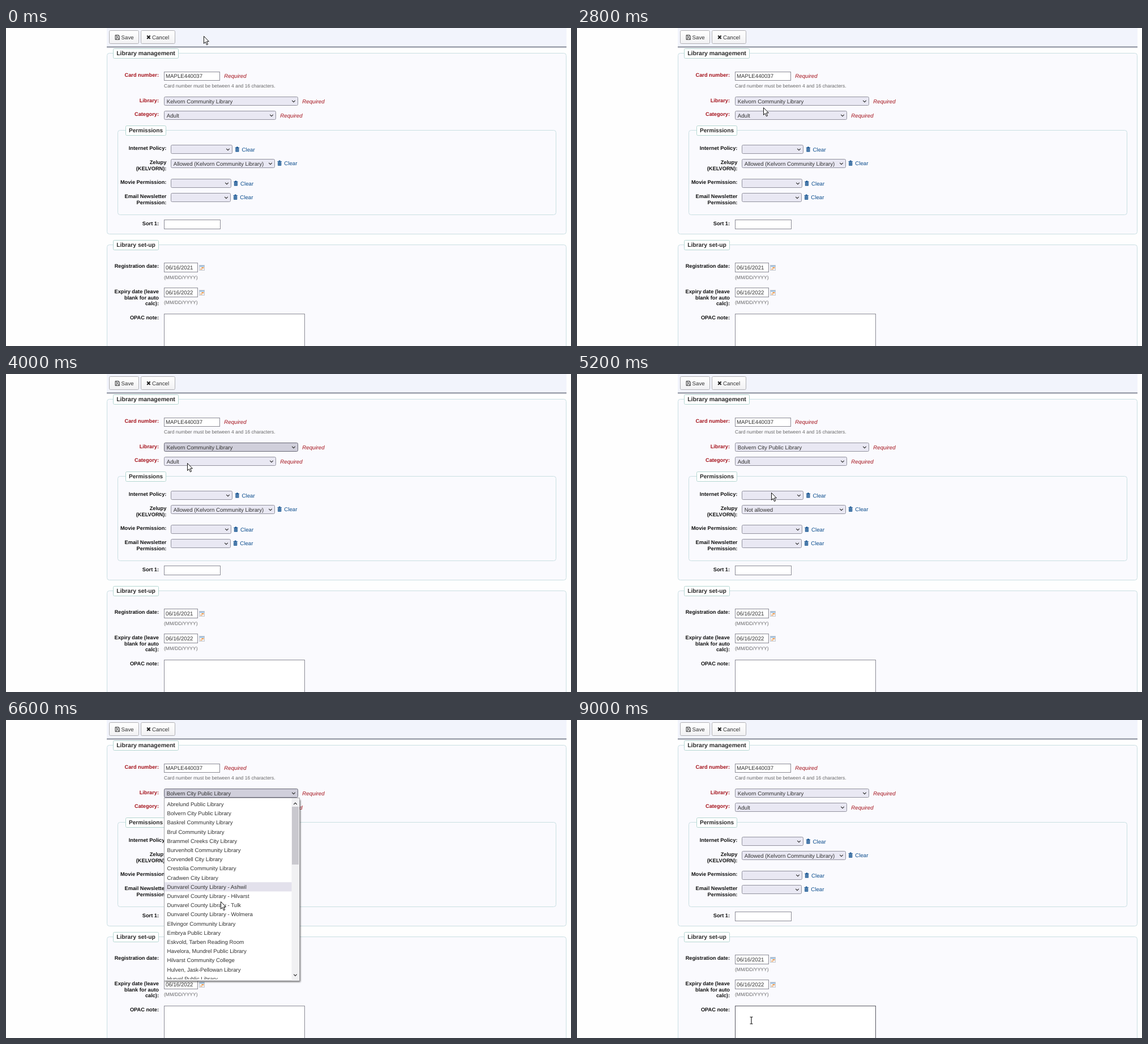
Recreate the animation shown at these times as an HTML page. Size 998 px wide and 561 px high, loop 9.2 s.

```html
<!DOCTYPE html>
<html lang="en">
<head>
<meta charset="utf-8">
<title>Patron form</title>
<style>
html, body { margin: 0; width: 100%; height: 100%; overflow: hidden; background: #fefefe; }
svg { display: block; }
text { font: 9.68px "Liberation Sans", Arial, sans-serif; fill: #333; text-rendering: geometricPrecision; white-space: pre; }
.label { font-size: 9.22px; font-weight: bold; fill: #111; text-anchor: end; }
.label.red { fill: #a5131c; }
.legend { font-weight: bold; text-anchor: middle; fill: #2b2b2b; }
.hint { font-size: 8.5px; fill: #666; }
.need { font-style: italic; fill: #a5131c; }
.link { fill: #0a4c8c; }
.set { fill: #fafafe; stroke: #c9dfe2; }
.tag { fill: #fff; stroke: #b4d6d1; }
.box { fill: #fff; stroke: #8c8c96; }
.pick { fill: #e9e8f3; stroke: #92929e; }
.pick.on { fill: #d0cfdb; stroke: #686876; }
.box.over { stroke: #595962; }
.arrow { fill: none; stroke: #333; stroke-width: 1.2; }
.btn { fill: url(#face); stroke: #b0b0b4; }
</style>
</head>
<body>
<svg id="stage" width="998" height="561" viewBox="0 0 998 561">
  <defs>
    <linearGradient id="face" x2="0" y2="1"><stop stop-color="#fff"/><stop offset="1" stop-color="#f1f1f3"/></linearGradient>
    <filter id="soft" x="-10%" y="-10%" width="120%" height="120%"><feGaussianBlur stdDeviation="1.6"/></filter>
    <clipPath id="view"><rect x="280" y="139" width="225" height="318.5"/></clipPath>
    <g id="trash" fill="#0a4c8c">
      <path d="M0 1.3H2.2V0H5V1.3H7.2V2.5H0Z"/>
      <path d="M.6 3H6.6V9H.6Z"/>
      <path d="M2.4 4V8M4.8 4V8" stroke="#fafafe" stroke-width=".7"/>
    </g>
    <g id="calendar">
      <rect x=".5" y=".5" width="9" height="9" fill="#f2f2f4" stroke="#c3c8d0"/>
      <rect x="1" y="1" width="8" height="2.4" fill="#9fc0de"/>
      <rect x="4.5" y="4" width="3.8" height="2" fill="#ef9a4a"/>
      <rect x="2" y="6.6" width="3.6" height="1.8" fill="#efb37c"/>
    </g>
  </defs>
  <g id="form"></g>
  <g id="menu">
    <rect x="281" y="141" width="239" height="321" fill="#000" opacity=".6" filter="url(#soft)"/>
    <rect x="279.5" y="137.5" width="239" height="322.5" fill="#fff" stroke="#a9a9ae"/>
    <g clip-path="url(#view)">
      <g id="rows"><rect id="hover" x="280" width="225" height="16.2" fill="#e3e1ec"/></g>
    </g>
    <rect x="504.5" y="138" width="13" height="321.5" fill="#f1f1f3"/>
    <rect id="thumb" x="505" width="12" height="102" fill="#c9c8ce"/>
    <path d="M508.3 149l2.7-2.8 2.7 2.8M508.3 448.6l2.7 2.8 2.7-2.8" class="arrow"/>
  </g>
  <g id="pointer">
    <path id="tip" d="M.5 .5V13.4L3.4 10.6 5.5 15.7 7.6 14.8 5.5 9.8H9.4Z" fill="#fff" stroke="#111"/>
    <path id="beam" d="M-2.5 -6H-.7L0 -5.4 .7 -6H2.5M0 -5.4V5.4M-2.5 6H-.7L0 5.4 .7 6H2.5" fill="none" stroke="#111" stroke-width="1.1"/>
  </g>
</svg>
<script>
const $ = id => document.getElementById(id);
const form = $('form');

function add(tag, attrs, parent = form) {
  const node = document.createElementNS('http://www.w3.org/2000/svg', tag);
  for (const key in attrs) node.setAttribute(key, attrs[key]);
  return parent.appendChild(node);
}
function text(x, y, value, cls = '', parent) {
  const node = add('text', { x, y, class: cls }, parent);
  node.textContent = value;
  return node;
}
// Outlined box given by its outer edges
const box = (cls, l, t, r, b, rx = 0) =>
  add('rect', { class: cls, x: l + .5, y: t + .5, width: r - l - 1, height: b - t - 1, rx });

function fieldset(l, t, r, b, title, tagL, tagR, size) {
  box('set', l, t, r, b, 4);
  box('tag', tagL, t - 8, tagR, t + 10, 2);
  text((tagL + tagR) / 2, t + 4.3, title, 'legend').style.fontSize = size + 'px';
}
function select(l, t, r, value = '') {
  const face = box('pick', l, t, r, t + 16, 2);
  add('path', { class: 'arrow', d: `M${r - 10.8} ${t + 6.8}l2.8 2.8 2.8-2.8` });
  return { face, label: text(l + 4.7, t + 11.6, value) };
}
function clear(x, y) {
  add('use', { href: '#trash', x, y: y - 8.2 });
  text(x + 11.7, y, 'Clear', 'link');
}
function date(t, value) {
  box('box', 279, t, 339, t + 17);
  text(282, t + 11.8, value);
  add('use', { href: '#calendar', x: 341, y: t + 4 });
  text(279, t + 29, '(MM/DD/YYYY)', 'hint');
}
function labels(x, items, cls = '') {
  for (const [y, value] of items) text(x, y, value, 'label ' + cls);
}

const town = 'Kelvorn Community Library', city = 'Bolvern City Public Library';

// Toolbar
add('rect', { x: 178, y: 0, width: 812, height: 33, fill: '#f2f4fc' });
add('rect', { x: 178, y: 32.6, width: 812, height: 1.8, fill: '#7d828f' });
add('rect', { x: 178, y: 34.4, width: 812, height: 1, fill: '#d3d5dc' });
box('btn', 182, 4, 235, 28, 2);
box('btn', 238, 4, 299, 28, 2);
add('path', { d: 'M193 12.5H199L200.5 14V20.5H193ZM194.8 12.5V15.3H198.4V12.5M194.8 20.5V17.4H198.8V20.5', fill: 'none', stroke: '#333', 'stroke-width': .9 });
add('path', { d: 'M249.2 13.6L254.6 19M254.6 13.6L249.2 19', stroke: '#222', 'stroke-width': 2.1 });
text(203.6, 19.6, 'Save');
text(258, 19.6, 'Cancel');

// Management
fieldset(178, 44, 990, 364, 'Library management', 189, 305, 10.55);
labels(270, [[86, 'Card number:'], [130.5, 'Library:'], [155.3, 'Category:']], 'red');
box('box', 279, 77, 378, 93);
text(282, 88.3, 'MAPLE440037');
text(385.3, 88.3, 'Required', 'need');
text(279, 105.4, 'Card number must be between 4 and 16 characters.', 'hint');
const library = select(279, 121, 516, town);
text(523.3, 132.5, 'Required', 'need');
select(279, 146, 477, 'Adult');
text(484.3, 157.5, 'Required', 'need');

// Permissions
fieldset(197, 180, 972, 330, 'Permissions', 211, 283, 10.1);
labels(283.4, [[215.2, 'Internet Policy:'], [240.3, 'Zelupy'], [251, '(KELVORN):'], [275.4, 'Movie Permission:'],
  [300.2, 'Email Newsletter'], [311.2, 'Permission:']]);
select(291, 206, 400);
const access = select(291, 231, 475);
select(291, 266, 398);
select(291, 291, 397);
clear(404.8, 217.6);
clear(479.6, 242);
clear(402.3, 277.6);
clear(401.6, 302);
labels(270, [[347.6, 'Sort 1:']]);
box('box', 279, 338, 379, 355);

// Set-up
fieldset(178, 382, 990, 600, 'Library set-up', 189, 270, 10.3);
labels(270, [[423.2, 'Registration date:'], [467.6, 'Expiry date (leave'], [478.6, 'blank for auto'], [489.4, 'calc):'], [513.6, 'OPAC note:']]);
date(414, '06/16/2021');
date(458, '06/16/2022');
const note = box('box', 279, 504, 528, 600);

// Drop-down rows
const pitch = 16.2, top0 = 140.4;
const names = ['Abrelund Public Library', city, 'Baskrel Community Library', 'Brul Community Library',
  'Brammel Creeks City Library', 'Burvenholt Community Library', 'Corvendell City Library',
  'Crestolia Community Library', 'Cradwen City Library', 'Dunvarel County Library - Ashwil',
  'Dunvarel County Library - Hilvarst', 'Dunvarel County Library - Tulk', 'Dunvarel County Library - Wolmera',
  'Ellvingor Community Library', 'Embrya Public Library', 'Eskvold, Tarben Reading Room',
  'Havelora, Mundrel Public Library', 'Hilvarst Community College', 'Hulven, Jask-Pellowan Library',
  'Hurvel Public Library', town, 'Lorvenstead Public Library', 'Lumdell Community Library',
  'Lysken Morvaine Library', 'McTrull Public Library', 'Mardell-Ovinkha Public Library',
  'Northeast Varlen Library System', 'Nolbrinvale Public Library', 'Obrel City Library',
  'Ostrumeely Public Library', 'Ovalkrona Public Library', 'Ommera Library'];
names.forEach((name, i) => text(284.5, top0 + i * pitch + 11.6, name, '', $('rows')));

// Time, x, y
const path = [[0, 349, 14], [800, 400, 130], [1400, 380, 232], [2200, 395, 238], [2800, 329, 140], [3000, 326, 128],
  [3600, 320, 160], [4000, 320, 157], [4800, 345, 232], [5200, 343, 209], [5800, 356, 126], [6000, 358, 132],
  [6400, 373, 240], [6600, 379, 320], [7000, 365, 330], [7400, 340, 290], [7600, 337, 280], [8000, 336, 279],
  [8400, 324, 268], [8600, 318, 350], [8800, 311, 460], [9000, 308, 530], [9200, 308, 530]];
// Time, scroll offset
const scroll = [[0, 193], [3100, 193], [3500, 0], [6800, 0], [7400, 193], [9200, 193]];

function at(keys, t, k) {
  const i = Math.max(1, keys.findIndex(key => key[0] >= t));
  const a = keys[i - 1], b = keys[i];
  return a[k] + (b[k] - a[k]) * (t - a[0]) / (b[0] - a[0]);
}
const within = (t, a, b) => t >= a && t < b;
const show = (node, on) => node.setAttribute('visibility', on ? 'visible' : 'hidden');

function draw(t) {
  const x = at(path, t, 1), y = at(path, t, 2);
  const open = within(t, 3000, 4000) || within(t, 6000, 8000);
  const swapped = within(t, 4200, 8200);
  const typing = y > 504;

  $('pointer').setAttribute('transform', `translate(${x} ${y})`);
  show($('tip'), !typing);
  show($('beam'), typing);
  note.classList.toggle('over', typing);

  library.face.classList.toggle('on', open || within(t, 4000, 4200) || within(t, 8000, 8200));
  library.label.textContent = swapped ? city : town;
  access.label.textContent = swapped ? 'Not allowed' : `Allowed (${town})`;

  $('menu').style.display = open ? '' : 'none';
  if (!open) return;
  const offset = at(scroll, t, 1);
  const trail = at(path, t - 60, 2); // highlight lags behind the pointer
  const row = trail < top0 ? names.indexOf(swapped ? city : town) : Math.floor((trail - top0 + offset) / pitch);
  $('hover').setAttribute('y', top0 + row * pitch);
  $('rows').setAttribute('transform', `translate(0 ${-offset})`);
  $('thumb').setAttribute('y', 153 + offset * .3575);
}

const loop = 9200, step = 200, start = performance.now();
function tick() {
  const t = (performance.now() - start) % loop;
  draw(Math.floor(t / step) * step);
  requestAnimationFrame(tick);
}
tick();
</script>
</body>
</html>
```
